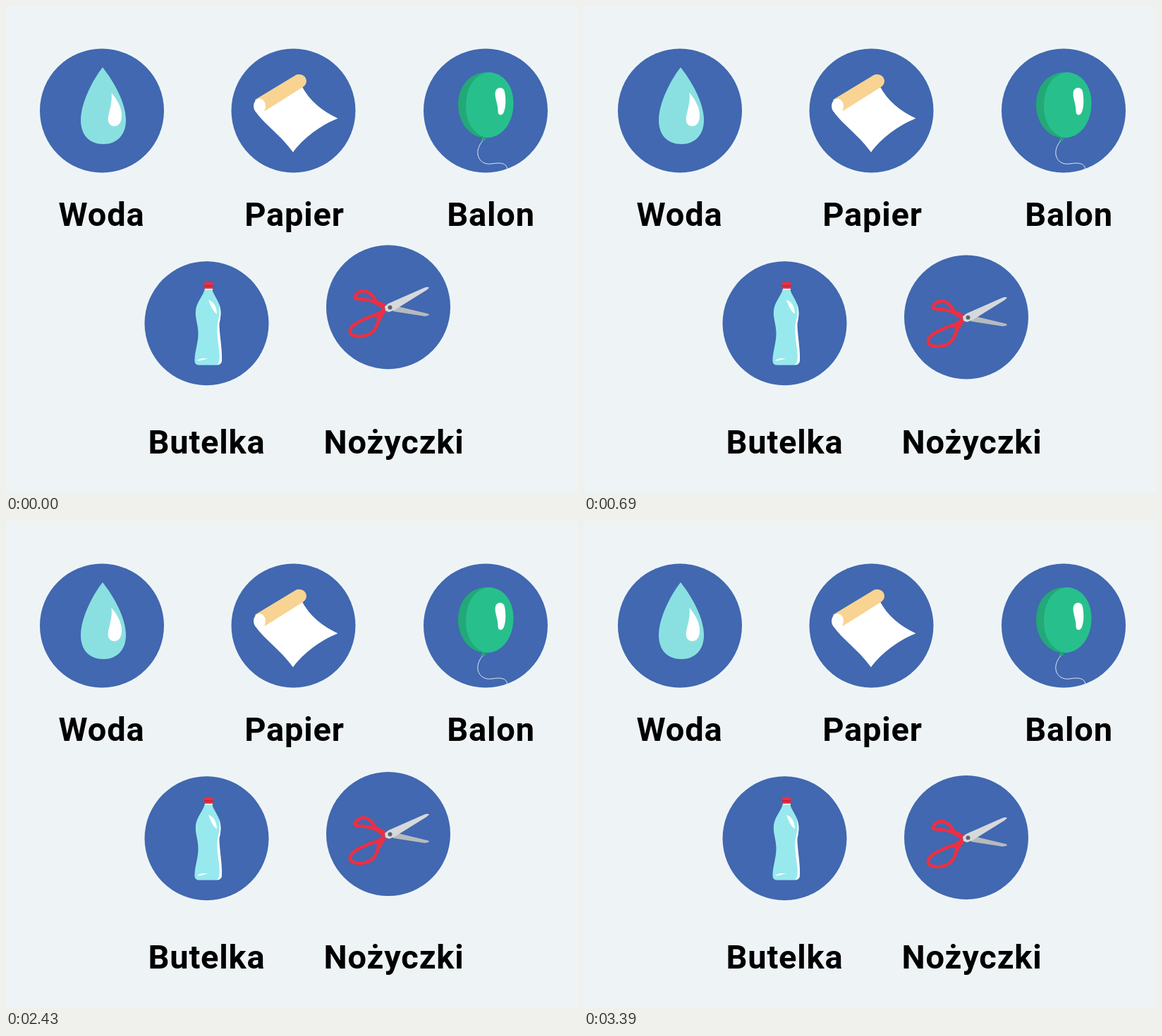
Write an HTML page that moves like this. It is 811 px wide and 691 px high and loops after 4.41 s.

```html
<!DOCTYPE html>
<html lang="pl">
<head>
<meta charset="utf-8">
<style>
  html, body { margin: 0; width: 100%; height: 100%; overflow: hidden; background: #eef4f6; }
  svg { display: block; width: 100%; height: 100%; }
  text { font: 600 47px Roboto, "Open Sans", sans-serif; letter-spacing: .8px; text-anchor: middle; fill: #000; }
  .disc { fill: #4168b0; }
  .white { fill: #fff; }
  .red { fill: #ed2f43; }
  .ring { fill: none; stroke: #ed2f43; stroke-width: 4.6; stroke-linejoin: round; }
</style>
</head>
<body>
<svg viewBox="0 0 811 691">
  <g class="disc">
    <circle cx="136" cy="148.5" r="88"/>
    <circle cx="407.5" cy="148.5" r="88"/>
    <circle cx="680" cy="148.5" r="88"/>
    <circle cx="284.5" cy="450.3" r="88"/>
  </g>

  <!-- water -->
  <path fill="#8ae0e1" d="M137 87C123 105 106 137 106 162C106 184 119 196 138 196C157 196 170 183 170 162C170 137 152 106 137 87Z"/>
  <path class="white" d="M149.500 123C157 132 164 143 164 155C164 165 160 170.500 153.500 170.500C147 170.500 143.500 165 145 157C147 146 151 136 149.500 123Z"/>

  <!-- paper -->
  <path class="white" d="M352 146C360 163 388 181 407 207.500C421 188 446 169 470.500 159.500C448 149 430 134 419 113L360 140Z"/>
  <path fill="#f8d392" d="M353 133L410 98.500C416 95 425 98 426 106C426 110 424 113 421 115L367 149L358 142Z"/>
  <ellipse class="white" cx="359.500" cy="142" rx="8.500" ry="10.500"/>

  <!-- balloon -->
  <path fill="none" stroke="#dfe8f4" stroke-width="1" d="M676 191C671 197 668 204 669 211C671 221 679 225 688 224C700 222 710 222 711 232"/>
  <path fill="#23a878" d="M677 185L673 191L681 190.500Z"/>
  <path fill="#23a878" d="M680 94C657 95 641 114 641 140C641 166 658 187 680 187Z"/>
  <path fill="#27c08d" d="M683 94C705 94 719.500 113 719.500 138C719.500 165 704 187 681 187C662 182 652 164 652 142C652 117 663 98 683 94Z"/>
  <path class="white" d="M694 121C696 115 704 114 706.500 120C709 129 709 143 706 150C704 156 698 156 697.500 150C698 139 692 130 694 121Z"/>

  <!-- bottle -->
  <path fill="#98e9ee" d="M282 401H292C294 411 304 420 304.500 433C305 443 301 450 301 461C301 475 306 490 306 503C306 508 302 509.500 298 509.500H275C269 509.500 267 507 267.500 501C268 489 273 476 272.500 463C272 450 268 443 269 432C270 420 280 411 282 401Z"/>
  <path class="white" d="M287 417C293 419 299 425 299 437C293 433 290 425 287 417ZM302 423C305 432 305 441 302.500 450C302 463 307 487 306 503C305 508 302 509 299 509C304 506 303 496 302 486C300 472 298 457 301 446C303 438 303 431 302 423ZM271 503C276 499 281 500 287 500C281 501 276 504 271 503Z"/>
  <rect x="282" y="399" width="11" height="4" fill="#d8eef4"/>
  <path class="red" d="M281 392Q287 391 293.500 392L293 401H281.500Z"/>
  <path fill="#b52236" d="M281 396.500H293.500V398H281Z"/>

  <!-- scissors, drawn around the disc centre -->
  <g id="scissors">
    <circle class="disc" r="88"/>
    <path fill="#b7babd" d="M5 -3L57 9.500L58 11.500L52 13L7 6Z"/>
    <path class="ring" d="M-16 -6C-20 -13 -25 -22.500 -35 -23C-42 -23 -48 -16 -47.500 -13C-46 -10 -30 -13 -16 -6Z"/>
    <path class="ring" d="M-14 11C-13 20 -16 30 -23 36C-32 43 -47 43 -53 38C-57 32 -50 25 -42 21C-33 17 -24 11 -14 11Z"/>
    <path class="red" d="M-20 -12L-4 -4L-6 4L-20 -5ZM-22 11L-6 2L-2 6L-5 9L-12 21L-16 13Z"/>
    <path fill="#d6d9db" d="M-5 -1L0 -5L51 -27.500Q56 -29.500 58 -27.500L54 -24L9 4L1 7L-4 5Z"/>
    <circle cx="2.500" cy="0.500" r="3" fill="#5d646c"/>
  </g>

  <text x="135.500" y="312">Woda</text>
  <text x="409" y="312">Papier</text>
  <text x="687.500" y="312">Balon</text>
  <text x="284.500" y="635">Butelka</text>
  <text x="550" y="635">Nożyczki</text>
</svg>
<script>
  const LOOP = 4410, STEP = 30, LAST = 3390;
  const REST = 450.3, FLOOR = 1.3;
  const CYCLE = 2560, LANDING = 110;
  const scissors = document.getElementById("scissors");

  const mod = (a, n) => ((a % n) + n) % n;

  // Height above rest: rebound, pause, slow dip, then a jump up and a quick drop
  function lift(t) {
    const p = mod(t - LANDING, CYCLE);
    const span = (a, b) => (p - a) / (b - a);
    if (p < 260) return FLOOR + 16 * (1 - (1 - span(0, 260)) ** 2);
    if (p < 700) return FLOOR + 16 * (1 - span(260, 700) ** 2);
    if (p < 970) return FLOOR;
    if (p < 2050) return FLOOR * (2 * span(970, 2050) - 1) ** 2;
    if (p < 2510) return FLOOR + 37 * span(2050, 2510) ** 3.8;
    return FLOOR + 37 * (1 - span(2510, CYCLE) ** 2);
  }

  function draw(now) {
    const t = Math.min(Math.floor((now % LOOP) / STEP) * STEP, LAST);
    scissors.setAttribute("transform", `translate(542 ${REST - lift(t)})`);
  }

  const origin = performance.now();
  function tick() {
    draw(performance.now() - origin);
    requestAnimationFrame(tick);
  }
  draw(0);
  requestAnimationFrame(tick);
</script>
</body>
</html>
```
